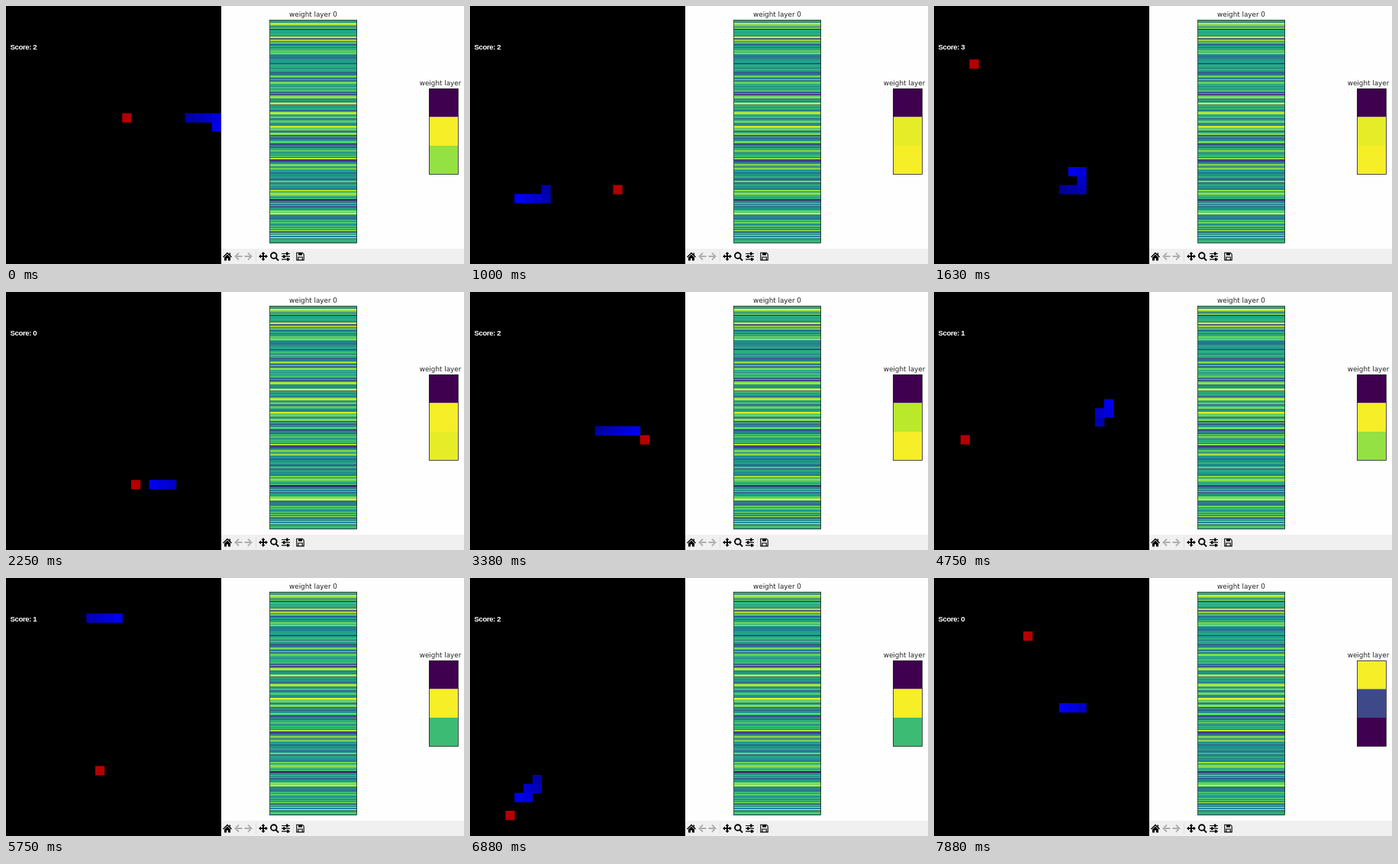
Animation, 600 px wide and 338 px high, one loop 8000 ms. Source, as an HTML page with a canvas:

```html
<!DOCTYPE html>
<html lang="en">
<head>
<meta charset="utf-8">
<title>Snake training</title>
<style>
html, body { margin: 0; width: 100%; height: 100%; overflow: hidden; background: #000; }
canvas { display: block; }
</style>
</head>
<body>
<canvas id="stage" width="600" height="338"></canvas>
<script>
const ctx = document.getElementById('stage').getContext('2d');
const CELL = 11.75, STEP = 125, LOOP = 8000, SPEED = 3, ROWS = 194;

// Each game: first step, start cell, food in order, output layer weights
const games = [
  { from: -4, start: [14,14], food: [[18,12],[23,12],[13,12]], out: [0,1,.83] },
  { from: 3, start: [13,14], food: [[8,21],[5,21],[16,20],[4,6]], out: [0,.97,1] },
  { from: 16, start: [22,21], food: [[14,21],[5,8]], out: [0,1,.97] },
  { from: 21, start: [5,10], food: [[14,15],[18,15],[19,16],[6,24]], out: [0,.89,1] },
  { from: 33, start: [13,21], food: [[19,12],[3,16]], out: [0,1,.83] },
  { from: 43, start: [3,4], food: [[12,4],[10,21],[4,26],[0,9]], out: [0,1,.68] },
  { from: 63, start: [14,14], food: [[10,6]], out: [1,.22,0] }
];

// The snake closes the larger gap to its food first and never reverses
function play({ start: [x, y], food }, moves) {
  let dx = Math.sign(food[0][0] - x), dy = 0, score = 0;
  const cells = [[x - 2 * dx, y], [x - dx, y], [x, y]];
  while (moves-- > 0 && food[score]) {
    const gx = food[score][0] - x, gy = food[score][1] - y;
    const across = [Math.sign(gx), 0], along = [0, Math.sign(gy)];
    const wishes = Math.abs(gx) >= Math.abs(gy) ? [across, along] : [along, across];
    [dx, dy] = [...wishes, [0, 1], [1, 0]]
      .find(([a, b]) => (a || b) && !(a === -dx && b === -dy));
    cells.push([x += dx, y += dy]);
    if (x === food[score][0] && y === food[score][1]) score++;
  }
  return { score, body: cells.slice(-3 - score).reverse() };
}

const viridis = ['400050','482878','3e4a89','31688e','26828e','1f9e89','35b779','72d957','b9e92b','f6ee27']
  .map(h => [0, 2, 4].map(i => parseInt(h.slice(i, i + 2), 16)));

function color(v) {
  const p = Math.max(0, Math.min(1, v)) * 9, i = Math.min(8, Math.floor(p));
  return `rgb(${viridis[i].map((c, j) => Math.round(c + (viridis[i + 1][j] - c) * (p - i)))})`;
}

function random(seed) {
  return () => {
    seed = (seed * 1664525 + 1013904223) >>> 0;
    return seed / 4294967296;
  };
}

// Input layer: shared random weights plus a small mutation for each game
const rnd = random(71);
const base = Array.from({ length: ROWS }, () => .58 + (rnd() + rnd() - 1) * .4);
const setRows = (ys, v) => ys.forEach(y => base[Math.round((y - 19) / 291 * ROWS)] = v);
setRows([22, 44, 127, 157, 213, 271], .95);
setRows([30, 74, 180, 201, 253], .1);

games.forEach((g, n) => {
  const r = random(900 + n * 7919);
  g.rows = base.map(v => v + (r() - .5) * .12);
});

function box(x, y, w, h, fill) {
  ctx.fillStyle = fill;
  ctx.fillRect(x, y, w, h);
}

function block([x, y], fill) {
  box(x * CELL - .5, y * CELL - .5, 12.2, 12.2, fill);
}

function label(text, x, y, font, fill, align, spacing = 0) {
  ctx.font = font;
  ctx.letterSpacing = spacing + 'px';
  ctx.fillStyle = fill;
  ctx.textAlign = align;
  ctx.fillText(text, x, y);
}

function frame(x, y, w, h) {
  ctx.strokeStyle = '#222';
  ctx.lineWidth = .8;
  ctx.strokeRect(x, y, w, h);
}

function drawGame(g, step) {
  const { score, body } = play(g, (step - g.from) * SPEED);
  box(0, 0, 282, 338, '#000');
  if (g.food[score]) block(g.food[score], '#b40000');
  for (let i = body.length - 1; i >= 0; i--) block(body[i], `rgb(0,0,${238 - 18 * i})`);
  label('Score: ' + score, 5.5, 56.7, 'bold 9.7px "Liberation Sans", Arial, sans-serif', '#fff', 'left', -.45);
}

function drawWeights(g) {
  const font = '8.8px "DejaVu Sans", sans-serif';
  box(282, 0, 318, 318, '#fefefe');
  label('weight layer 0', 402.5, 14, font, '#222', 'center');
  label('weight layer 1', 573.2, 104, font, '#222', 'center');
  const edge = i => Math.round(19 + i * 291 / ROWS);
  g.rows.forEach((v, i) => box(346, edge(i), 114, edge(i + 1) - edge(i), color(v)));
  frame(345.5, 18.5, 114, 292);
  g.out.forEach((v, i) => box(554, 108 + i * 37.5, 38, 37.5, color(v)));
  frame(554.5, 108.5, 38, 112);
}

// Toolbar icons: left edge, colour, filled shape, stroked lines, line width
const icons = [
  [284, '#000', 'M0 6L6 0L8.5 2.5V1H10V4L12 6L11 7L6 2L1 7ZM2 7L6 3L10 7V11H7V8H5V11H2Z', '', 1],
  [299, '#b0b0b0', '', 'M10.5 5.5H1.5M6 1L1.5 5.5L6 10', 1.9],
  [312, '#b0b0b0', '', 'M.5 5.5H9.5M5 1L9.5 5.5L5 10', 1.9],
  [331, '#000', 'M6 -.5L8.5 2.5H3.5ZM6 11.5L8.5 8.5H3.5ZM0 5.5L3 3V8ZM12 5.5L9 3V8Z', 'M6 2V9M2 5.5H10', 1.9],
  [346, '#000', '', 'M8.6 4.5A3.8 3.8 0 1 1 1 4.5A3.8 3.8 0 1 1 8.6 4.5M7.5 7.3L11 11', 1.9],
  [361, '#000', 'M6 0H8.5V4H6ZM2 3.8H4.5V7.5H2ZM7 7.5H9.5V11.3H7Z', 'M0 2H11M0 5.6H11M0 9.4H11', 1.1],
  [380, '#000', 'M3 1H8V4H3Z', 'M.8 .8H8.3L10.2 2.7V10.4H.8ZM2.8 10V6.5H8.2V10', 1.1]
];

function drawToolbar() {
  box(282, 318, 318, 20, '#f0f0f0');
  box(327, 321, 1, 14, '#ddd');
  box(376, 321, 1, 14, '#ddd');
  for (const [x, tint, fill, line, width] of icons) {
    ctx.save();
    ctx.translate(x, 322.5);
    ctx.fillStyle = ctx.strokeStyle = tint;
    ctx.lineWidth = width;
    ctx.fill(new Path2D(fill));
    ctx.stroke(new Path2D(line));
    ctx.restore();
  }
}

function draw() {
  const step = Math.floor(performance.now() % LOOP / STEP);
  const game = games.filter(g => g.from <= step).pop();
  drawGame(game, step);
  drawWeights(game);
  drawToolbar();
  requestAnimationFrame(draw);
}
draw();
</script>
</body>
</html>
```
